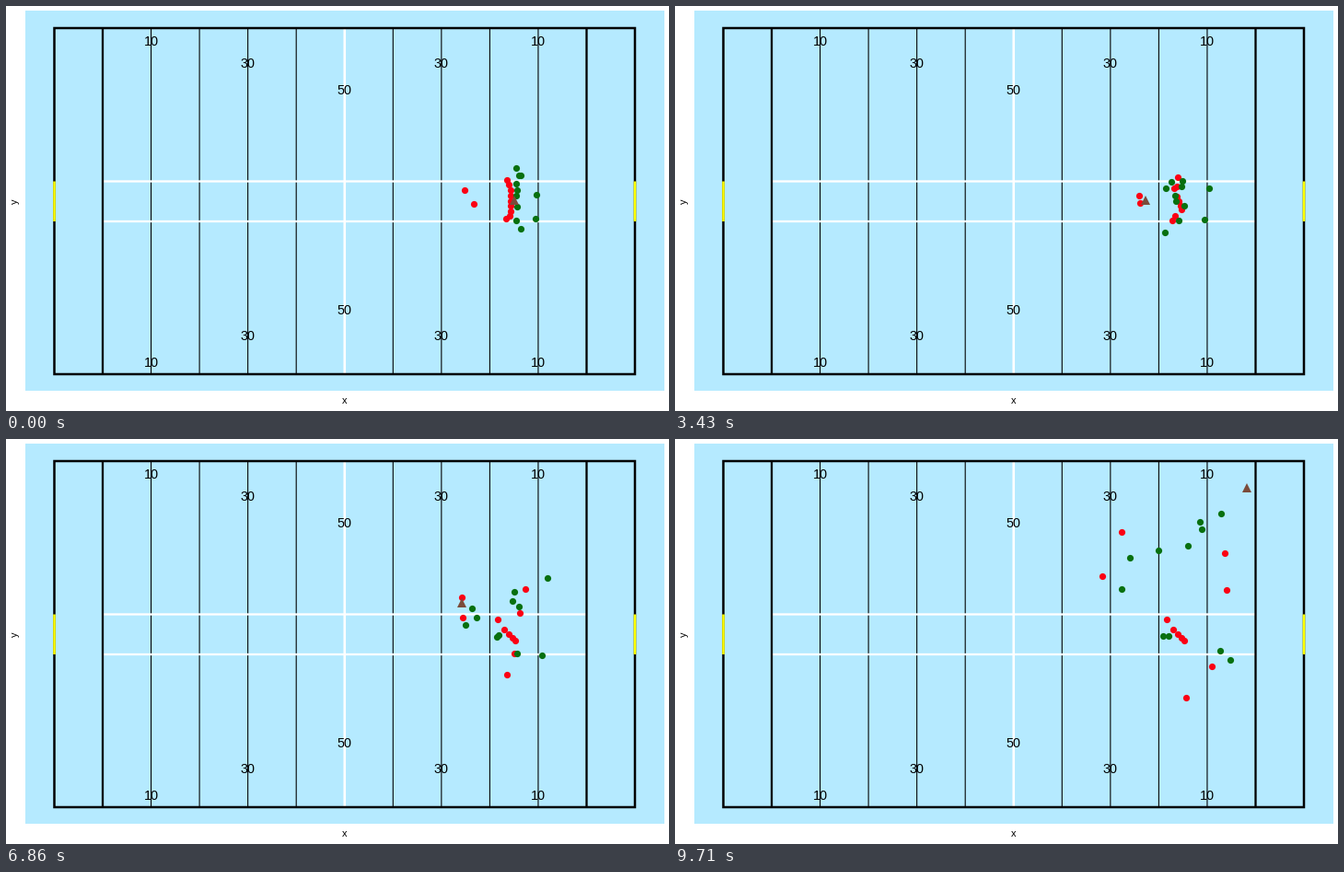
Write a matplotlib script that moves like this. It is 720 by 440 pixels and loops after 9860 ms.

```python
import numpy as np
import matplotlib.pyplot as plt
from matplotlib.animation import FuncAnimation
from matplotlib.patches import Rectangle

W, H, DPI = 720, 440, 100
LOOP, TICK = 9860, 34       # ms
STEP = 1000 / 7             # ms between tracked positions
SNAP, CATCH, MESH, THROW, END = 11, 26, 34, 48, 68
PT = 72 / DPI               # points per pixel
TURF, RED, GREEN, BROWN = "#b5eaff", "#fb0013", "#08700f", "#7b4b3a"
T = np.arange(END + 1)

fig = plt.figure(figsize=(W / DPI, H / DPI), dpi=DPI, facecolor="white")
ax = fig.add_axes([0, 0, 1, 1])
ax.set_xlim(0, W)
ax.set_ylim(H, 0)
ax.axis("off")


def line(x0, y0, x1, y1, color="black", width=1.1, z=2):
    ax.plot([x0, x1], [y0, y1], color=color, lw=width * PT, zorder=z,
            solid_capstyle="butt", snap=False)


def text(x, y, s, px, **kw):
    ax.text(x, y, s, fontsize=px * PT, family="Liberation Sans", ha="center",
            va="baseline", rotation_mode="anchor", zorder=6, **kw)


def draw_field():
    left, right, top, bottom = 52.5, 683, 24, 400
    goals = goal_l, goal_r = 105, 630.5
    yards = np.linspace(goal_l, goal_r, 11)
    ax.add_patch(Rectangle((21, 5.5), 693.5, 413, fc=TURF, lw=0, zorder=0))
    for x in yards[1:-1]:
        line(x, top, x, bottom)
    line(yards[5], top, yards[5], bottom, "white", 2.6)
    for y in (190.5, 234):
        line(goal_l, y, goal_r, y, "white", 2.3, 3)
    for x in goals:
        line(x, top, x, bottom, width=2.3, z=4)
    ax.add_patch(Rectangle((left, top), right - left, bottom - top, fill=False,
                           ec="black", lw=2.5 * PT, zorder=4, snap=False))
    for x in (left, right):
        line(x, 190.5, x, 234, "yellow", 2.6, 5)
    for k, y_top, y_bottom in ((1, 38.5, 387.5), (3, 62.5, 358.5), (5, 91.5, 330.5)):
        for x in {yards[k], yards[-1 - k]}:
            for y in (y_top, y_bottom):
                text(x, y + 4.3, f"{10 * k}", 14.4)
    text(367.5, 432.5, "x", 11)
    text(13, 212, "y", 11, rotation=90)


def glide(keys, pts, settle):
    """Monotone cubic path through pts; settle brings it to rest at the end."""
    keys, pts = np.array(keys, float), np.array(pts, float)
    h = np.diff(keys)[:, None]
    s = np.diff(pts, axis=0) / h
    a, b = s[:-1], s[1:]
    same = a * b > 0
    mid = np.where(same, 2 * a * b / np.where(same, a + b, 1), 0)
    m = np.vstack([s[:1], mid, s[-1:] * (not settle)])
    i = np.clip(np.searchsorted(keys, T, side="right") - 1, 0, len(h) - 1)
    u = ((T - keys[i]) / h[i, 0])[:, None]
    return ((1 + 2 * u) * (1 - u) ** 2 * pts[i] + u * (1 - u) ** 2 * h[i] * m[i]
            + u * u * (3 - 2 * u) * pts[i + 1] + u * u * (u - 1) * h[i] * m[i + 1])


tracks = {RED: [], GREEN: []}


def run(color, start, cut, end, cut_at=MESH, settle=False):
    """Wait for the snap, move to the cut, then break for the end point."""
    path = glide((0, SNAP, cut_at, END), (start, start, cut, end), settle)
    tracks[color].append(path)
    return path


# offensive line falls back into a slanted wall
for k in range(5):
    spot = (534 + 7.5 * k - 0.7 * k * k, 196 + 11.5 * k ** 0.5)
    run(RED, (548, 200 + 5.8 * k), spot, spot, cut_at=40)

# backs and receivers
passer = run(RED, (508, 215), (503, 212), (484.5, 101), cut_at=30)
run(RED, (497.5, 200), (508, 210), (463.5, 149.5))
run(RED, (544, 189), (549, 181), (596.5, 124))
run(RED, (546, 194), (543.5, 198), (599, 164))
run(RED, (547, 228), (541, 227.5), (583, 247.5))
run(RED, (542.5, 231), (538.5, 237), (554.5, 281.5), settle=True)

# pass rush
run(GREEN, (554, 176), (518, 208), (493.5, 129), cut_at=32)
run(GREEN, (557, 184), (510, 202), (525, 121.5), cut_at=42)
run(GREEN, (558.5, 242), (529, 246), (485, 163.5), cut_at=26, settle=True)
run(GREEN, (555, 200), (535, 211), (535.5, 214))
run(GREEN, (554, 206), (536, 216), (530, 214))

# coverage
run(GREEN, (558.5, 184.5), (546, 194.5), (570, 90))
run(GREEN, (554, 193), (547, 198.5), (556.5, 116.5))
run(GREEN, (555, 218), (552, 214.5), (572, 98.5))
run(GREEN, (554, 233), (542, 233.5), (591.5, 230.5))
run(GREEN, (575.5, 205.5), (584.5, 185.5), (593, 81))
run(GREEN, (574.5, 231), (574.5, 232.5), (603, 240.5))


def ball_path():
    # straight snap, carried by the passer, then a slowing throw
    snap = np.column_stack([552 - 3.62 * np.maximum(T - 12.7, 0), 0 * T + 211.3])
    sway = -3 + 9 * np.clip((T - MESH) / (THROW - MESH), 0, 1)
    held = passer + np.column_stack([0 * T, sway])
    u = np.clip((T - THROW) / (END - THROW), 0, 1)[:, None]
    flight = held[THROW] + ((620.5, 53.5) - held[THROW]) * (1 - (1 - u) ** (1.18, 1.34))
    t = T[:, None]
    return np.where(t < CATCH, snap, np.where(t < THROW, held, flight))


draw_field()
ball_track = ball_path()
dots = {c: ax.plot([], [], "o", color=c, ms=7.2 * PT, mew=0, zorder=z, snap=False)[0]
        for c, z in ((RED, 7), (GREEN, 8))}
ball, = ax.plot([], [], "^", color=BROWN, ms=9.4 * PT, mew=0, zorder=9, snap=False)


def update(n):
    # positions change in whole steps
    i = min(int((n + 1) * TICK / STEP), END)
    for color, artist in dots.items():
        artist.set_data(*np.array([p[i] for p in tracks[color]]).T)
    ball.set_data(*ball_track[i:i + 1].T)
    return [*dots.values(), ball]


anim = FuncAnimation(fig, update, frames=LOOP // TICK, interval=TICK,
                     repeat=True, repeat_delay=0, blit=False)
plt.show()
```
